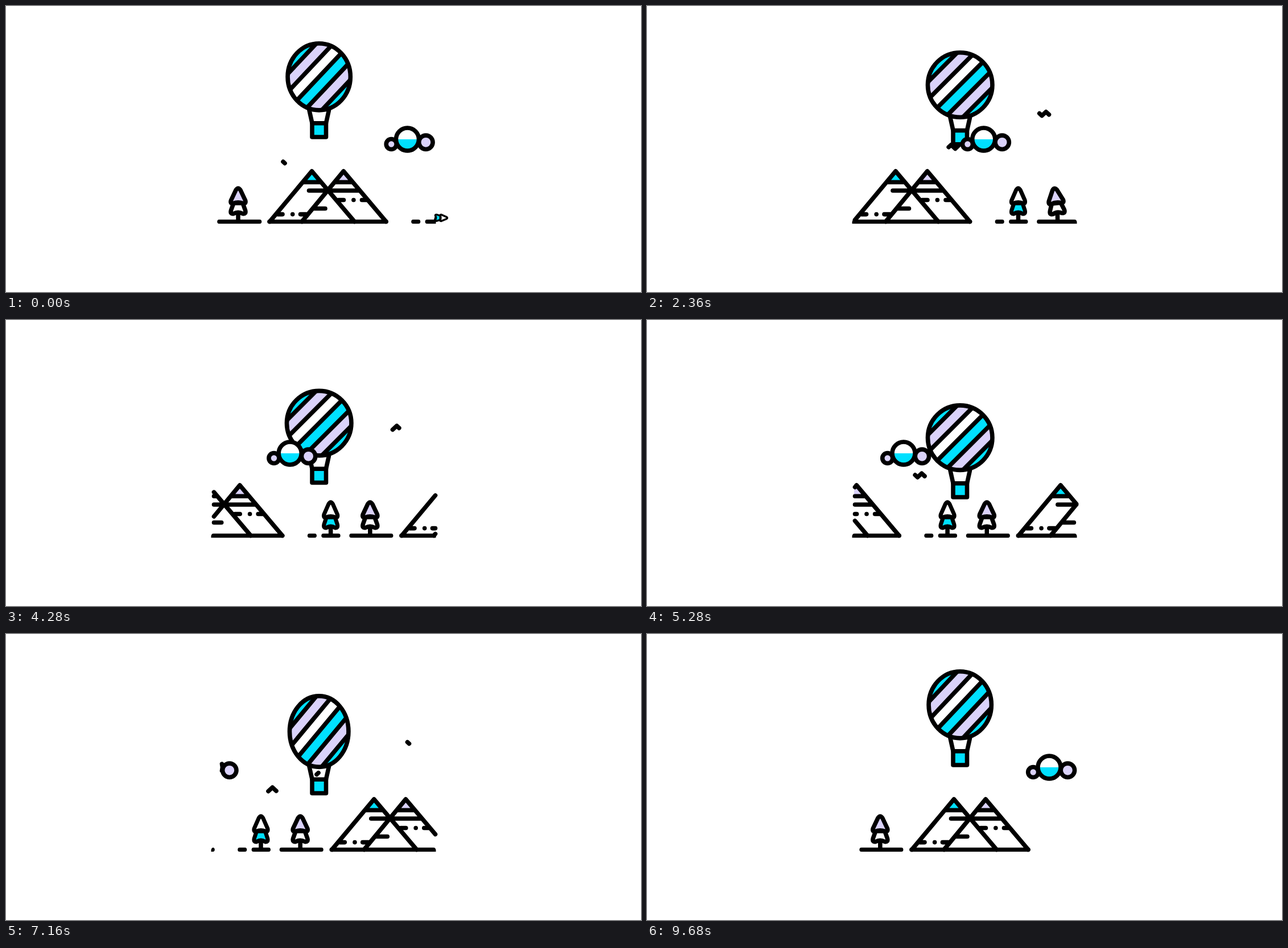
An HTML page for the animation above (9720 ms loop, 1116 px wide and 502 px high).

```html
<!DOCTYPE html>
<html lang="en">
<head>
<meta charset="utf-8">
<title>Balloon ride</title>
<style>
  html, body { margin: 0; width: 100%; height: 100%; overflow: hidden; background: #fff; }
  svg { display: block; position: absolute; left: 0; top: 0; }
  .line { fill: none; stroke: #000; stroke-width: 7.6; stroke-linecap: round; stroke-linejoin: round; }
  .cyan { fill: #00e0ff; }
  .lilac { fill: #dad2fa; }
  .white { fill: #fff; }
  .fixed { vector-effect: non-scaling-stroke; }
</style>
</head>
<body>
<svg width="1116" height="502" viewBox="0 0 1116 502">
  <defs>
    <clipPath id="groundClip"><path d="M360.5 382.4V380Q360.5 374.5 366 374.5H750Q755.5 374.5 755.5 380V382.4Z"/></clipPath>
    <clipPath id="hillClip"><rect x="364" y="280" width="392" height="100"/></clipPath>
    <clipPath id="cloudClip"><rect x="380" y="200" width="372" height="70"/></clipPath>
    <clipPath id="ballClip"><circle r="56.75"/></clipPath>
  </defs>
  <g clip-path="url(#groundClip)"><path id="ground" class="line"/></g>
  <g id="trees"></g>
  <g clip-path="url(#hillClip)">
    <path id="cyanCap" class="cyan"/>
    <path id="lilacCap" class="lilac"/>
  </g>
  <path id="hills" class="line"/>
  <path id="birds" class="line"/>
  <g id="balloon">
    <path id="wind" class="line"/>
    <path class="line" d="M533-47L538-24.5M567.5-47L562.5-24.5"/>
    <rect class="line" style="fill:#00e0ff" x="538" y="-24.3" width="24.5" height="24.3"/>
    <g id="ball">
      <g clip-path="url(#ballClip)"><g id="stripes" transform="rotate(-45)"></g></g>
      <circle class="line fixed" r="56.75"/>
    </g>
  </g>
  <g id="cloud">
    <circle id="puffL" class="line" style="fill:#dad2fa"/>
    <circle id="puffR" class="line" style="fill:#dad2fa"/>
    <g clip-path="url(#cloudClip)">
      <circle id="coreTop" class="white" cy="234" r="20"/>
      <path id="coreFill" class="cyan"/>
    </g>
    <path id="core" class="line"/>
  </g>
</svg>
<script>
const LOOP = 9720, STEP = 40;
const SPEED = 0.0426, SPAN = 414.3;
const LEFT = 365.5, RIGHT = 754.5;
const GROUND = 378.5, PEAK = 290;

const el = id => document.getElementById(id);
const set = (id, attrs) => { for (const k in attrs) el(id).setAttribute(k, attrs[k]); };
const clamp = (v, lo = 0, hi = 1) => Math.min(hi, Math.max(lo, v));
const smooth = v => { v = clamp(v); return v * v * (3 - 2 * v); };
const mod = (a, n) => ((a % n) + n) % n;

// Smooth curve through [time, value] points, flat at both ends
function curve(pts, t) {
  const slope = i => {
    const a = pts[i - 1], b = pts[i + 1];
    return a && b ? (b[1] - a[1]) / (b[0] - a[0]) : 0;
  };
  let i = 0;
  while (i < pts.length - 2 && t > pts[i + 1][0]) i++;
  const [t0, v0] = pts[i], [t1, v1] = pts[i + 1];
  const h = t1 - t0, u = clamp((t - t0) / h), w = 1 - u;
  return v0 * (1 + 2 * u) * w * w + slope(i) * h * u * w * w
       + v1 * u * u * (3 - 2 * u) - slope(i + 1) * h * u * u * w;
}

// Segment cut to the window between LEFT and RIGHT
function segment(x1, y1, x2, y2) {
  if (x1 > x2) [x1, y1, x2, y2] = [x2, y2, x1, y1];
  if (x2 < LEFT - 2 || x1 > RIGHT) return '';
  const at = x => x2 === x1 ? y1 : y1 + (y2 - y1) * (x - x1) / (x2 - x1);
  const a = clamp(x1, LEFT, RIGHT), b = clamp(x2, LEFT, RIGHT);
  return `M${a} ${at(a)}L${b + 0.01} ${at(b)}`;
}

const hillLines = [
  [0, PEAK, -74, GROUND], [0, PEAK, 75, GROUND],
  [55.7, PEAK, -17.5, GROUND], [55.7, PEAK, 130.5, GROUND],
  [-14, 309.3, 15, 309.3], [42, 309.3, 71, 309.3],
  [-5, 324, 82, 324],
  [47, 340.5, 56, 340.5], [73.4, 340.5, 73.4, 340.5], [88, 340.5, 97, 340.5],
  [4, 355.5, 23.5, 355.5],
  [-60, 365.6, -51.5, 365.6], [-33.8, 365.6, -33.8, 365.6], [-20, 365.6, -10, 365.6]
];
const groundLines = [
  [-162.5, -92], [-74.5, 130.5], [178.5, 187], [202.9, 228.7], [252, 321.5],
  [SPAN - 74.5, SPAN + 130.5]
];

function drawLand(x) {
  const peaks = [x, x + SPAN];
  set('hills', { d: peaks.map(p =>
    hillLines.map(l => segment(p + l[0], l[1], p + l[2], l[3])).join('')).join('') });
  const cap = dx => peaks.map(p => `M${p + dx} ${PEAK}l16 19h-32Z`).join('');
  set('cyanCap', { d: cap(0) });
  set('lilacCap', { d: cap(55.7) });
  set('ground', { d: groundLines.map(g => `M${x + g[0]} ${GROUND}H${x + g[1]}`).join('') });
}

// Trees: offset along the land, time of rising, width, colours
const trees = [
  { dx: -129.5, rise: -9000, wide: 1, top: 'lilac', low: 'white' },
  { dx: 215.5, rise: -80, wide: 0.93, top: 'white', low: 'cyan' },
  { dx: 284.7, rise: 1820, wide: 1, top: 'lilac', low: 'white' }
];
const topShape = 'M-4-55Q0-61 4-55L12.5-37Q14.5-31 9-31.5Q0-35-9-31.5Q-14.5-31-12.5-37Z';
const lowShape = 'M-8-32L-12.5-19.5Q-14.5-12.5-8-13.5Q0-18 8-13.5Q14.5-12.5 12.5-19.5L8-32Z';
const fillOf = { lilac: '#dad2fa', cyan: '#00e0ff', white: '#fff' };
el('trees').innerHTML = trees.map((tree, i) =>
  `<g id="tree${i}"><path class="line" d="M0-15V0"/><g id="crown${i}">` +
  `<path class="line" style="fill:${fillOf[tree.low]}" d="${lowShape}"/>` +
  `<path class="line" style="fill:${fillOf[tree.top]}" d="${topShape}"/></g></g>`).join('');

function drawTree(tree, i, land, t) {
  const x = land + tree.dx, age = t - tree.rise;
  const fall = clamp((402 - x) / 36);
  const shown = age > 0 && fall < 1;
  set('tree' + i, { visibility: shown ? 'visible' : 'hidden' });
  if (!shown) return;
  const grow = 1 - Math.pow(1 - clamp(age / 420), 3);
  const sway = 115 * Math.cos(age / 300) * Math.exp(-age / 400);
  const trunk = sway * 0.18 + 20 * Math.sin(Math.PI * Math.min(fall * 2, 1));
  const crown = sway - 160 * fall * fall;
  const size = grow * (1 - smooth((fall - 0.3) / 0.7));
  set('tree' + i, { transform: `translate(${x} ${GROUND - 0.5}) scale(${size}) rotate(${trunk})` });
  set('crown' + i, { transform: `rotate(${crown - trunk} 0 -14) scale(${tree.wide} 1)` });
}

// Birds run along a short zigzag
const FLAP = 1680, LEAD = 96, HALF = 7.25, TRACK = HALF * 4;
const birds = [
  { x: 490, y: 276, delay: 0, dir: -1 },
  { x: 708.5, y: 192.5, delay: 440, dir: -1 },
  { x: 549, y: 243.7, delay: 440, dir: 1 }
];
function birdPath({ x, y, delay, dir }, t) {
  const time = mod(t + LEAD - delay, FLAP) - LEAD;
  const head = clamp((time + 45) * 0.066, 0, TRACK);
  const tail = clamp((time - 209) * 0.065, 0, TRACK);
  if (tail >= TRACK) return '';
  const stops = [tail];
  for (let k = HALF; k < TRACK; k += HALF) if (k > tail && k < head) stops.push(k);
  stops.push(head + 0.01);
  const rise = d => { const m = mod(d, HALF * 2); return Math.min(m, HALF * 2 - m) / HALF * 6.7; };
  return 'M' + stops.map(d => `${x - d} ${y + dir * rise(d)}`).join('L');
}

// Balloon: height of the basket's lower edge, and stretch while climbing
const height = [
  [0, 230], [1400, 234], [2040, 238.5], [3280, 258.5], [4040, 279], [5280, 311],
  [5950, 317], [7160, 279.5], [8000, 248], [8440, 239.5], [9000, 233], [LOOP, 230]
];
const stretch = [[0, 0.32], [600, 0], [5900, 0], [6700, 1], [8440, 1], [LOOP, 0.32]];
function eased(pts, t) {
  let i = 0;
  while (i < pts.length - 2 && t > pts[i + 1][0]) i++;
  const [a, b] = [pts[i], pts[i + 1]];
  return a[1] + (b[1] - a[1]) * smooth((t - a[0]) / (b[0] - a[0]));
}

const cuts = [-2, -1, 0, 1, 2].map(k => k * 21.8);
const bands = ['cyan', 'lilac', 'white', 'cyan', 'lilac', 'cyan'];
el('stripes').innerHTML =
  bands.map((c, i) => {
    const y = i ? cuts[i - 1] : -60, end = i < 5 ? cuts[i] : 60;
    return `<rect class="${c}" x="-60" y="${y}" width="120" height="${end - y}"/>`;
  }).join('') +
  cuts.map(y => `<path class="line fixed" d="M-60 ${y}H60"/>`).join('');

// Wind lines: right end, length, height above the basket's lower edge
const winds = [[470.5, 20.5, -90], [476.5, 7.5, -77.5], [484.5, 16.5, -65]];
function windPath(t) {
  const u = (t - (t < 6000 ? 3150 : 8000)) / 1000;
  if (u <= 0 || u >= 1) return '';
  const head = smooth(u / 0.44), tail = smooth((u - 0.5) / 0.5);
  return winds.map(([x, len, y]) => `M${x - len * tail} ${y}H${x - len * head - 0.01}`).join('');
}

function drawBalloon(t) {
  const y = curve(height, t), s = eased(stretch, t);
  set('balloon', { transform: `translate(0 ${y})` });
  set('ball', { transform:
    `translate(550.2 ${-104.4 - 4 * s}) scale(${1 - s * 5 / 56.75} ${1 + s * 5.5 / 56.75})` });
  set('wind', { d: windPath(t) });
}

function drawPuff(id, x, y, r) {
  const size = clamp((760 - x) / 12) * clamp((x - 368) / 12);
  set(id, {
    cx: x, cy: y, r: r * size,
    'stroke-opacity': size > 0 ? 1 : 0, style: `fill:#dad2fa;stroke-width:${7.6 * size}`
  });
}

// Outline of the middle puff, kept between two x limits
function corePath(x) {
  const r = 20, cy = 234, lo = (379.5 - x) / r, hi = (746.5 - x) / r;
  if (lo >= 1 || hi <= -1) return '';
  const arc = (a, b) => {
    const p = k => `${x + r * Math.cos(k)} ${cy + r * Math.sin(k)}`;
    return `M${p(a)}A${r} ${r} 0 ${b - a > Math.PI ? 1 : 0} 1 ${p(b)}`;
  };
  if (lo > -1) { const a = Math.acos(lo); return arc(-a, a); }
  if (hi < 1) { const a = Math.acos(hi); return arc(a, 2 * Math.PI - a); }
  return arc(0, Math.PI) + arc(Math.PI, 2 * Math.PI);
}

// Cyan part of the middle puff: full on entry, then sinking to half
function coreLevel(x) {
  const up = 19.9 * smooth((x - 740) / 25), half = Math.sqrt(400 - up * up);
  return `M${x - half} ${234 - up}A20 20 0 1 0 ${x + half} ${234 - up}Z`;
}

function drawCloud(t) {
  const x = t < 7900 ? 705.5 - 0.0482 * t : 705.1 + 0.047 * (LOOP - t);
  drawPuff('puffL', x - 28.3, 242.5, 9);
  drawPuff('puffR', x + 32.4, 239.3, 12.2);
  set('coreTop', { cx: x });
  set('coreFill', { d: coreLevel(x) });
  set('core', { d: corePath(x) });
}

function draw(t) {
  const land = 537.5 - SPEED * t;
  drawLand(land);
  trees.forEach((tree, i) => drawTree(tree, i, land, t));
  set('birds', { d: birds.map(b => birdPath(b, t)).join('') });
  drawBalloon(t);
  drawCloud(t);
}

const start = performance.now();
function tick() {
  const t = (performance.now() - start) % LOOP;
  draw(Math.floor(t / STEP) * STEP);
  requestAnimationFrame(tick);
}
tick();
</script>
</body>
</html>
```
